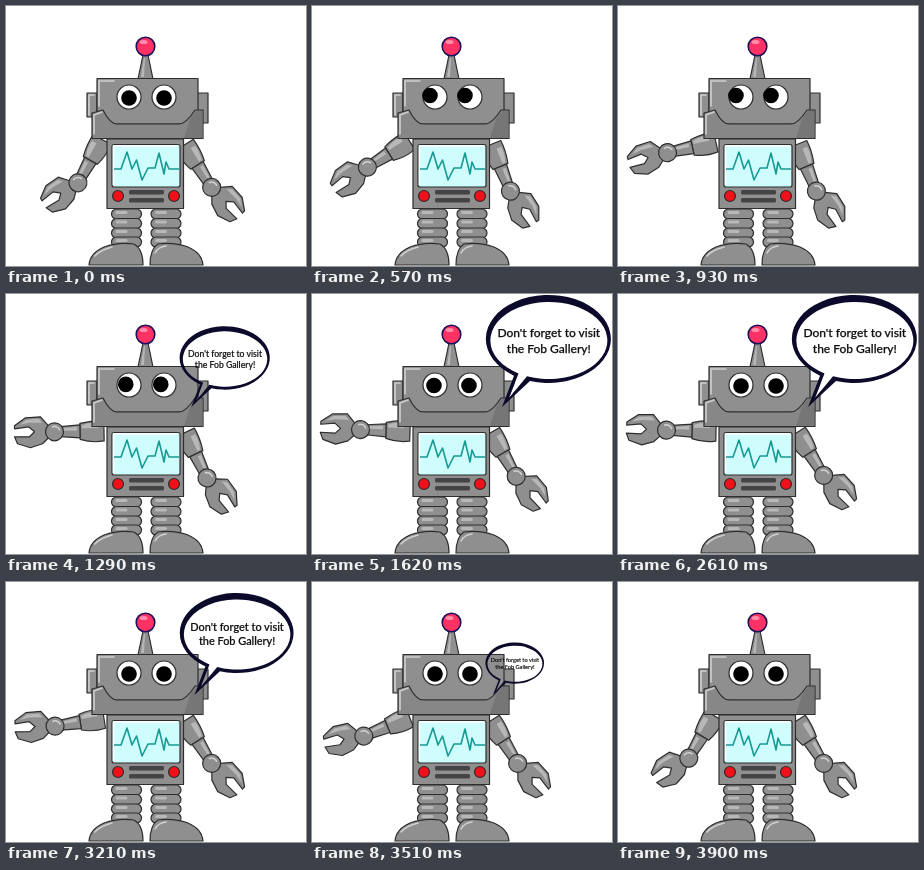
Animation of 300 by 260 pixels, one loop 3930 ms. Source, as an HTML page:

```html
<!DOCTYPE html>
<html lang="en">
<head>
<meta charset="utf-8">
<title>Waving robot</title>
<style>
  html, body { margin: 0; width: 100%; height: 100%; overflow: hidden; background: #fff; }
  svg { display: block; }
  .o { stroke: #2e2e2e; stroke-width: 1.2; stroke-linejoin: round; }
  .m { fill: #8f8f8f; }
  .d { fill: #767676; }
  .l { fill: #b8b8b8; }
  .shine { fill: none; stroke: #d0d0d0; stroke-width: 1.6; stroke-linecap: round; }
  text { font: 500 12px Lato, "Open Sans", sans-serif; text-anchor: middle; fill: #111; stroke: #111; stroke-width: .25; }
</style>
</head>
<body>
<svg width="300" height="260" viewBox="0 0 300 260">
  <defs>
    <g id="upper">
      <path class="o m" d="M-4-10 Q8-11 20-8 V8 Q8 12-4 10Z"/>
      <path class="l" d="M2-8 Q10-9 18-6 V-3 H2Z"/>
      <path class="o m" d="M20-6.5 L40-5 V5 L20 6.5Z"/>
      <path class="l" d="M23-4.500 L37-3.500 V-1 H23Z"/>
    </g>
    <g id="claw">
      <path class="o m" d="M6-6 L14-15 L29-14 L40-6 V-3 L26-5 L20 0 L25 5 H40 L37 12 L24 16 L12 12 L6 6Z"/>
      <path class="l" d="M12-9 L16-13 L28-12 L35-7 L25-9Z"/>
      <circle class="o m" r="9"/>
      <path class="shine" d="M-5-2 A5.500 5.500 0 0 1 2-5"/>
    </g>
    <path id="shell" d="M206.500 79.400 L197 104 L215 82.200 A58.500 38.500 0 1 0 206.500 79.400Z"/>
  </defs>

  <g id="armL"><use href="#upper"/><use id="handL" href="#claw"/></g>
  <g id="armR"><use href="#upper"/><use href="#claw" transform="translate(46.500 0) rotate(-14)"/></g>

  <g id="legs"></g>
  <path class="o m" d="M83 259 Q84 247 98 241 Q112 236 128 238 Q137 243 137 259Z"/>
  <path class="o m" d="M197 259 Q196 247 182 241 Q168 236 152 238 Q144 243 144 259Z"/>
  <path class="shine" d="M89 250 Q94 244 106 241 M149 247 Q152 241 160 240"/>

  <path class="o m" d="M101 133 H177.500 V202.500 H101Z"/>
  <rect class="o" x="106" y="138.500" width="68" height="42.500" rx="2" fill="#cffcfc"/>
  <path d="M107.500 179 V140 H172" fill="none" stroke="#fff" stroke-width="1.500"/>
  <path d="M108 163 H115 L121 146 L126 163 L130.500 154 L136 174 L142 162 H149 L153 147 L158 168 L160 156 L163 163 H173"
    fill="none" stroke="#159b93" stroke-width="1.600" stroke-linejoin="round"/>
  <g fill="#444"><rect x="123" y="184" width="35" height="4.500" rx="1.500"/><rect x="123" y="192" width="35" height="4.500" rx="1.500"/></g>
  <g class="o" fill="#ee1119"><circle cx="112" cy="190" r="5.500"/><circle cx="168" cy="190" r="5.500"/></g>

  <path class="o m" d="M132 73 L137 49 H142 L147 73Z"/>
  <path class="l" d="M135 71 L138 52 H139 L138 71Z"/>
  <circle cx="139.500" cy="40.500" r="9.300" fill="#ff3265" stroke="#1b1158" stroke-width="1.600"/>
  <ellipse cx="137.500" cy="36" rx="4" ry="2" fill="#ff8eaa"/>

  <path class="o m" d="M81 87 H91 V111 H81Z M191 87 H202 V117 H191Z"/>
  <path class="shine" d="M83 109 V89 H88"/>
  <path class="o m" d="M91 72.500 H192 V118 H91Z"/>
  <path class="shine" d="M93 100 V75 H108"/>
  <path class="o" fill="#878787" d="M86 107 L97 104 Q104 118 111 118 H173 Q180 118 189 104 H197 V132.500 H86Z"/>
  <path class="d" d="M184 113 L190 105 H196.500 V132 H178Z"/>
  <path class="shine" d="M88 128 V109 L96 106"/>
  <g class="o" fill="#fff"><circle cx="123" cy="91" r="12"/><circle cx="158" cy="91" r="12"/></g>
  <g id="pupils"><circle cx="123" cy="92" r="7.800"/><circle cx="158" cy="92" r="7.800"/></g>

  <g id="bubble">
    <use id="fill" href="#shell" fill="#fff"/>
    <path fill="#0b0a2b" fill-rule="evenodd" d="M202 81.700 L190 113 L218 87 A62.500 44 0 1 0 202 81.700Z
      M206.500 79.400 L197 104 L215 82.200 A58.500 38.500 0 1 0 206.500 79.400Z"/>
    <text x="236.800" y="43">Don't forget to visit</text>
    <text x="236.800" y="58.500">the Fob Gallery!</text>
  </g>
</svg>
<script>
const LOOP = 3930, STEP = 30;
const $ = id => document.getElementById(id);
const set = (id, transform) => $(id).setAttribute('transform', transform);
const clamp = x => Math.min(1, Math.max(0, x));

// Stacked rings of both legs
$('legs').innerHTML = [120.5, 160].map(x => [208, 217.5, 227, 236].map(y =>
  `<rect class="o m" x="${x - 15}" y="${y - 5}" width="30" height="10" rx="5"/>
   <rect class="l" x="${x - 11}" y="${y - 3}" width="12" height="3" rx="1.5"/>`).join('')).join('');

// Smooth curve through [time, value] keys, without overshoot
function track(keys) {
  const slope = i => (keys[i + 1][1] - keys[i][1]) / (keys[i + 1][0] - keys[i][0]);
  const tangent = i => {
    if (i < 1 || i > keys.length - 2) return 0;
    const a = slope(i - 1), b = slope(i);
    return a * b > 0 ? 2 * a * b / (a + b) : 0;
  };
  return t => {
    let i = 0;
    while (i < keys.length - 2 && t >= keys[i + 1][0]) i++;
    const [t0, v0] = keys[i], [t1, v1] = keys[i + 1];
    const d = t1 - t0, p = (t - t0) / d, q = 1 - p;
    return v0 * q * q * (1 + 2 * p) + v1 * p * p * (3 - 2 * p)
      + d * p * q * (tangent(i) * q - tangent(i + 1) * p);
  };
}

const armAngle = track([[0, 61], [570, 32], [1080, 6], [1290, 1], [2160, -4], [2610, -1], [3210, 9], [3780, 41], [3930, 61]]);
const handAngle = track([[0, 31], [570, 32], [1080, 6], [1290, 0], [2160, -6], [2610, -3], [3210, 1], [3780, 20], [3930, 31]]);
const glance = track([[0, 0], [570, 1], [1000, 1], [1290, .65], [1900, 0], [LOOP, 0]]);

function bubbleScale(t) {
  const grow = 1 - (1 - clamp((t - 1080) / 445)) ** 2;
  const shrink = clamp((t - 3000) / 700) ** 2;
  return grow - shrink;
}

function draw(t) {
  const arm = armAngle(t), look = glance(t), s = bubbleScale(t);
  set('armL', `translate(94 137) scale(-1 1) rotate(${arm})`);
  set('handL', `translate(45.5 0) rotate(${handAngle(t) - arm})`);
  set('armR', `translate(181 142) rotate(${58 + 10 * look})`);
  set('pupils', `translate(${-5 * look} ${-2.5 * look})`);
  set('bubble', `translate(173 113) scale(${s}) translate(-173 -113)`);
  $('bubble').style.display = s > 0 ? '' : 'none';
  $('fill').style.display = s < 1 ? 'none' : ''; // see-through while it scales
}

const start = performance.now();
function tick() {
  const t = (performance.now() - start) % LOOP;
  draw(Math.floor(t / STEP) * STEP);
  requestAnimationFrame(tick);
}
tick();
</script>
</body>
</html>
```
